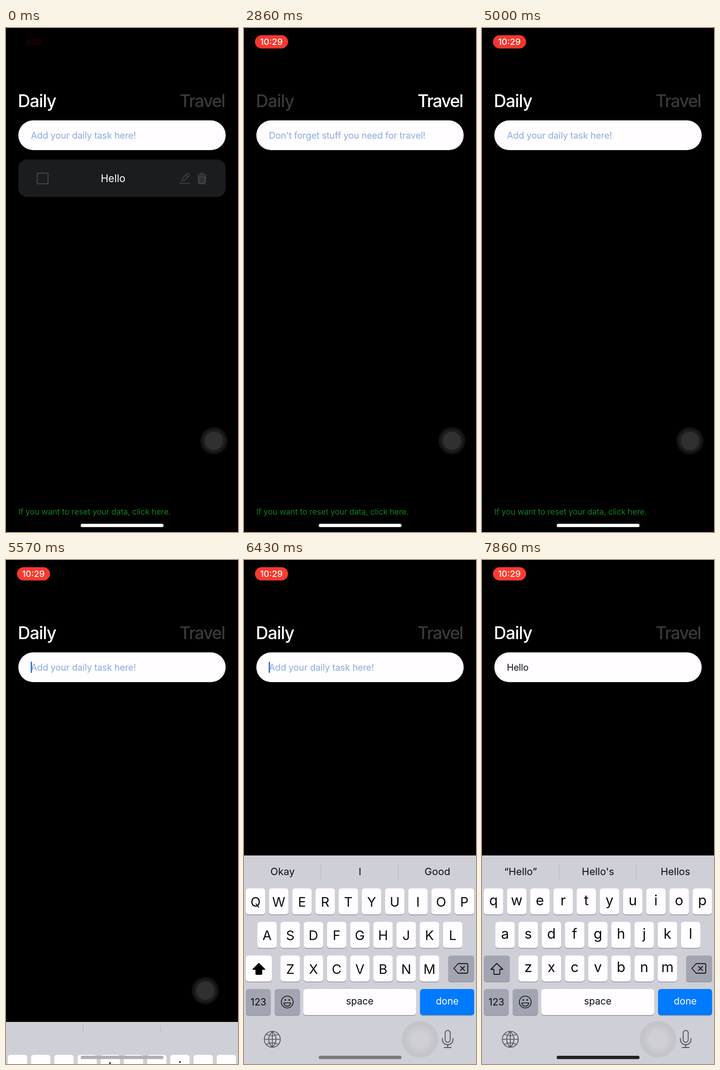
These frames come from a looping animation (508x1102 px, 8000 ms). An HTML page with a canvas:

```html
<!DOCTYPE html>
<html lang="en">
<head>
<meta charset="utf-8">
<title>Task list</title>
<style>
  html, body { margin: 0; width: 100%; height: 100%; overflow: hidden; background: #000; }
  canvas { display: block; width: 100vw; height: 100vh; }
</style>
</head>
<body>
<canvas id="stage" width="508" height="1102"></canvas>
<script>
const ctx = document.getElementById('stage').getContext('2d');
const LOOP = 8000, STEP = 1000 / 7;
const WHITE = '#fffdff', INK = '#0b0b0d';
const KEY_W = 42.5, KEY_H = 57, KEY_PITCH = 50.8;
const KEYBOARD_TOP = 645.5;

const CARD_GONE = 5, TIME_SHOWN = 18, TO_TRAVEL = 20, TO_DAILY = 34, FOCUS = 38;
const CAPS_ON = 42, TYPED_AT = [46, 48, 49, 50, 51];
const WORD = 'Hello';
const SUGGESTIONS = [['I', 'Good'], ['Hey', 'How'], ['Hey', 'Hello'],
  ['Hello', 'Help'], ['Hello', 'Hell'], ["Hello's", 'Hellos']];

const clamp = v => Math.max(0, Math.min(1, v));
const smooth = v => v * v * (3 - 2 * v);

function box(x, y, w, h, r, color) {
  ctx.fillStyle = color;
  ctx.beginPath();
  ctx.roundRect(x, y, w, h, r);
  ctx.fill();
}

function disc(x, y, r, color) {
  ctx.fillStyle = color;
  ctx.beginPath();
  ctx.arc(x, y, r, 0, 7);
  ctx.fill();
}

function line(d, color, width = 2, fill = false) {
  const path = new Path2D(d);
  ctx.lineWidth = width;
  ctx.strokeStyle = ctx.fillStyle = color;
  ctx.lineCap = ctx.lineJoin = 'round';
  ctx.stroke(path);
  if (fill) ctx.fill(path);
}

function text(str, x, y, size, color, { align = 'left', weight = 400, spacing = 0 } = {}) {
  ctx.font = `${weight} ${size}px Inter, sans-serif`;
  ctx.letterSpacing = spacing + 'px';
  ctx.textAlign = align;
  ctx.fillStyle = color;
  ctx.fillText(str, x, y);
  return ctx.measureText(str).width;
}

function drawPill(step, time) {
  const grow = clamp(step / 3);
  ctx.save();
  if (step === 0) {
    box(43, 25, 37, 12, 6, '#140004');
  } else {
    ctx.globalAlpha = grow * (0.972 + 0.028 * Math.cos((time - 4140) / 1860 * 2 * Math.PI));
    const s = 0.5 + 0.5 * grow;
    ctx.translate(60, 30.3);
    ctx.scale(s, s);
    ctx.translate(-60, -30.3);
    box(24, 15.8, 72.5, 29, 14.5, '#ff3b30');
    ctx.globalAlpha = grow;
    if (step < TIME_SHOWN) {
      ctx.strokeStyle = '#fff';
      ctx.lineWidth = 2;
      ctx.beginPath();
      ctx.arc(60, 30.5, 9, 0, 7);
      ctx.stroke();
      disc(60, 30.5, 4.7, '#fff');
    } else {
      text('10:29', 60, 37, 19, '#fff', { align: 'center', weight: 500 });
    }
  }
  ctx.restore();
}

function drawCard() {
  const gray = '#414143';
  box(27, 287.5, 454, 82, 19, '#1b1c20');
  ctx.strokeStyle = gray;
  ctx.lineWidth = 2.5;
  ctx.strokeRect(68.5, 317.5, 23.5, 23);
  text(WORD, 234.5, 336.5, 22.5, '#fff', { align: 'center' });
  line('M380 339.5H402', gray);
  line('M385 334L386.500 328.500L396.500 318.500Q398 317 400 319L401 320Q402.500 321.500 401 323L391 333ZM394 321L399 326', gray, 1.8);
  line('M419 321.500H439M425 321V318H433V321', gray, 2.2);
  line('M420.500 325H437.500L436 340.500H422Z', gray, 2, true);
  line('M425 327.500L425.500 337.500M429 327.500V337.500M433 327.500L432.500 337.500', '#1b1c20', 1.6);
}

function drawField(travel, typed, step) {
  box(27, 202, 454, 65, 32.5, WHITE);
  const hint = travel ? "Don't forget stuff you need for travel!" : 'Add your daily task here!';
  const width = text(typed || hint, 54.5, 242, 20, typed ? INK : '#8babe0', { spacing: -0.2 });
  const lastAction = typed ? TYPED_AT[typed.length - 1] : FOCUS;
  if (step >= FOCUS && (step - lastAction) % 7 < 4) {
    box(54 + (typed ? width : 0), 222, 3, 25, 1.5, '#3e72d9');
  }
}

function drawKey(x, y, w, color) {
  box(x, y + 1.5, w, KEY_H, 6, '#8d8f96');
  box(x, y, w, KEY_H, 6, color);
}

function drawLetters(caps) {
  [['qwertyuiop', 4, 72], ['asdfghjkl', 29.2, 145.3], ['zxcvbnm', 80, 218.7]].forEach(([row, left, y]) => {
    [...row].forEach((letter, i) => {
      const x = left + i * KEY_PITCH;
      drawKey(x, y, KEY_W, WHITE);
      if (caps) text(letter.toUpperCase(), x + KEY_W / 2, y + 40, 29, INK, { align: 'center' });
      else text(letter, x + KEY_W / 2, y + 36.5, 31, INK, { align: 'center' });
    });
  });
}

function drawKeyboard(top, step, typed) {
  const center = { align: 'center' };
  const modifier = '#a2a5b1', icon = '#505157';
  const caps = step >= CAPS_ON && !typed;
  const opening = step < 40;

  ctx.save();
  ctx.translate(0, top);
  box(0, 0, 508, 460, 0, '#cfd0d7');
  for (const x of [168, 337.5]) box(x, opening ? 8 : 18, 1.2, opening ? 17 : 34, 0, '#b5b7be');
  if (!opening) {
    const first = typed ? `“${typed}”` : 'Okay';
    [first, ...SUGGESTIONS[typed.length]].forEach((word, i) => {
      const shown = caps || typed ? word : word.toLowerCase();
      text(shown, 84.5 + i * 169.5, 43, 22, INK, center);
    });
  }

  drawLetters(caps);

  // Shift and delete
  drawKey(4, 218.7, 57, caps ? WHITE : modifier);
  line('M32.500 236L45.500 249H39V259Q39 260 38 260H27Q26 260 26 259V249H19.500Z', caps ? '#000' : INK, 1.8, caps);
  drawKey(447, 218.7, 57, modifier);
  line('M459.500 247L468 237.500Q469 236.500 470 236.500H487Q490 236.500 490 239.500V254.500Q490 257.500 487 257.500H470Q469 257.500 468 256.500ZM474 242.500L483 251.500M483 242.500L474 251.500', INK, 1.8);

  // Bottom row
  drawKey(4, 292, 54.5, modifier);
  text('123', 31.5, 328, 21, INK, center);
  drawKey(67, 292, 55.5, modifier);
  line('M81.700 320.500a13 13 0 1 0 26 0a13 13 0 1 0 -26 0', INK, 1.6);
  line('M87 322.500H102.500Q101 329.500 94.700 329.500Q88.500 329.500 87 322.500Z', INK, 1.6);
  disc(90.5, 316, 1.8, INK);
  disc(99, 316, 1.8, INK);
  drawKey(130, 292, 247, WHITE);
  text('space', 253.5, 326, 21, INK, center);
  drawKey(385.5, 292, 118.5, '#007aff');
  text('done', 445, 326, 21, '#fff', center);

  // Globe and microphone
  line('M44.500 402a17.500 17.500 0 1 0 35 0a17.500 17.500 0 1 0 -35 0H79.500M62 384.500V419.500M62 384.500Q46 402 62 419.500Q78 402 62 384.500M49 391Q62 398 75 391M49 413Q62 406 75 413', icon, 1.7);
  line('M440.500 388a5.500 5.500 0 0 1 11 0V403a5.500 5.500 0 0 1 -11 0ZM434.500 400V403a11.500 11 0 0 0 23 0V400M446 414V420M438.500 420H453.500', icon, 1.9);
  ctx.restore();
}

function drawTouchButton(time) {
  const move = smooth(clamp((time - 5459) / 330));
  const x = 455.3 - 70 * move, y = 902.5 + 145.5 * move;
  disc(x, y, 40, 'rgba(20,8,20,.06)');
  disc(x, y, 29.8, 'rgba(255,245,255,.07)');
  disc(x, y, 25, 'rgba(255,250,255,.05)');
  disc(x, y, 19.8, 'rgba(255,250,255,.08)');
}

function drawTitle(str, x, spacing, active) {
  text(str, x, 172.5, 37.5, active ? '#fff' : '#39393b', { weight: 500, spacing });
}

function draw(step) {
  const time = step * STEP;
  const travel = step >= TO_TRAVEL && step < TO_DAILY;
  const typed = WORD.slice(0, TYPED_AT.filter(at => step >= at).length);

  box(0, 0, 508, 1102, 0, '#000');
  drawPill(step, time);
  drawTitle('Daily', 26, -1.1, !travel);
  drawTitle('Travel', 380, -1.8, travel);
  drawField(travel, typed, step);
  if (step < CARD_GONE) drawCard();
  text('If you want to reset your data, click here.', 27, 1064, 17.6, '#148019', { spacing: -0.12 });

  // The keyboard rises like a critically damped spring
  const rise = Math.max(0, time - 5525) * 0.0178;
  const keyboardShown = rise > 0;
  if (keyboardShown) {
    const left = (1 + rise) * Math.exp(-rise);
    drawKeyboard(Math.round(KEYBOARD_TOP + 456 * left), step, typed);
  }
  drawTouchButton(time);

  const gray = keyboardShown ? Math.round(176 - (time - 5571) * 0.062) : 255;
  box(163.5, 1084, 181.5, 7.3, 3.65, `rgb(${gray},${gray},${Math.min(255, gray + 3)})`);
}

const start = performance.now();
function tick() {
  const time = (performance.now() - start) % LOOP;
  draw(Math.floor((time + 5) / STEP) % 56);
  requestAnimationFrame(tick);
}
tick();
</script>
</body>
</html>
```
